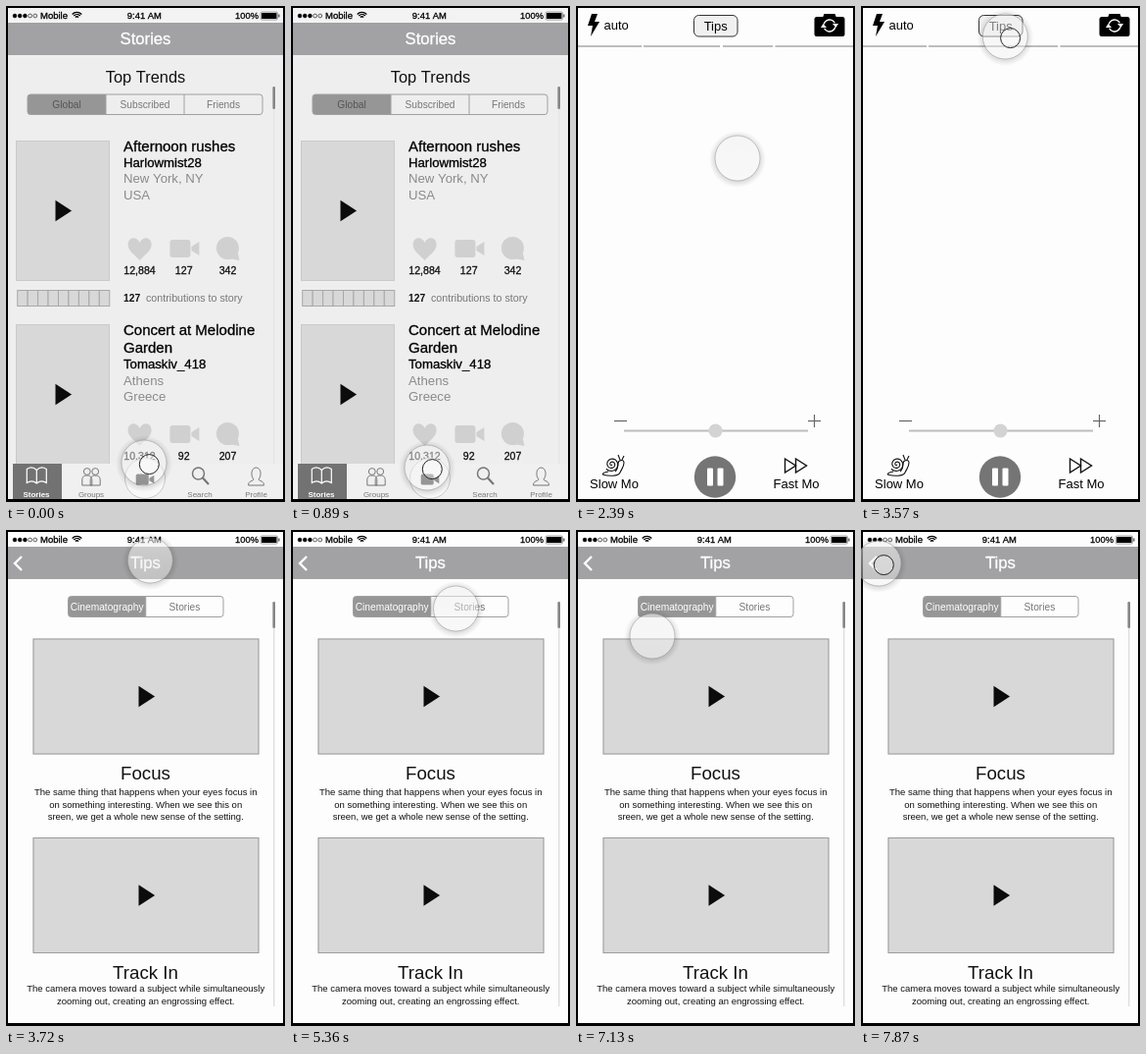
An HTML page with a canvas that plays this animation: 285 px wide and 505 px high, repeating every 8000 ms.

```html
<!DOCTYPE html>
<html lang="en">
<head>
<meta charset="utf-8">
<title>App walkthrough</title>
<style>
html, body { margin: 0; width: 100%; height: 100%; overflow: hidden; background: #000; }
canvas { display: block; width: 285px; height: 505px; }
</style>
</head>
<body>
<canvas id="stage"></canvas>
<script>
const W = 285, H = 505, LOOP = 8000, STEP = 148.6;
const canvas = document.getElementById('stage');
const ctx = canvas.getContext('2d');
const dpr = window.devicePixelRatio || 1;
canvas.width = W * dpr;
canvas.height = H * dpr;

// Touch path: [step, x, y]
const path = [
  [0, 141, 465], [1, 141, 466], [3, 139, 470], [12, 139, 470],
  [13, 141, 450], [14, 149, 365], [15, 159, 245], [16, 165, 155], [17, 167, 127],
  [18, 167, 127], [19, 164, 109], [20, 152, 55], [21, 147.3, 31],
  [31, 147.3, 31], [36, 168.5, 80], [39, 182, 138],
  [40, 189, 168], [41, 204, 240], [42, 217, 335], [43, 205, 404],
  [44, 178, 430], [45, 136, 375], [46, 102, 220], [47, 87, 126],
  [48, 78, 108], [49, 50, 58], [50, 26, 32], [51, 18, 34], [54, 18, 34]
];
const presses = [0, 6, 23, 24, 53];
const CAMERA_AT = 7, TIPS_AT = 25;

function touchAt(n) {
  const i = path.findIndex(k => k[0] > n);
  const a = path[i - 1], b = path[i];
  const s = (n - a[0]) / (b[0] - a[0]);
  return [a[1] + (b[1] - a[1]) * s, a[2] + (b[2] - a[2]) * s];
}

// Drawing helpers
function text(str, x, y, size, color = '#000', align = 'left', weight = 400) {
  ctx.font = `${weight} ${size}px "Liberation Sans", Arial, sans-serif`;
  ctx.textAlign = align;
  ctx.fillStyle = color;
  ctx.fillText(str, x, y);
  // Medium weight: regular glyphs with a hairline outline
  if (weight === 500) {
    ctx.strokeStyle = color;
    ctx.lineWidth = 0.3;
    ctx.strokeText(str, x, y);
  }
}
const centered = (str, x, y, size, color, weight) => text(str, x, y, size, color, 'center', weight);

function box(x, y, w, h, color) {
  ctx.fillStyle = color;
  ctx.fillRect(x, y, w, h);
}
function paint(fill, stroke, width = 1) {
  if (fill) { ctx.fillStyle = fill; ctx.fill(); }
  if (stroke) { ctx.strokeStyle = stroke; ctx.lineWidth = width; ctx.stroke(); }
}
function round(x, y, w, h, r, fill, stroke, width) {
  ctx.beginPath();
  ctx.roundRect(x, y, w, h, r);
  paint(fill, stroke, width);
}
function disc(x, y, r, fill, stroke, width) {
  ctx.beginPath();
  ctx.arc(x, y, r, 0, Math.PI * 2);
  paint(fill, stroke, width);
}
function shape(d, x, y, fill, stroke, width) {
  const p = new Path2D(d);
  ctx.save();
  ctx.translate(x, y);
  if (fill) { ctx.fillStyle = fill; ctx.fill(p); }
  if (stroke) { ctx.strokeStyle = stroke; ctx.lineWidth = width || 1; ctx.stroke(p); }
  ctx.restore();
}
function line(x1, y1, x2, y2, color, width = 1) {
  ctx.beginPath();
  ctx.moveTo(x1, y1);
  ctx.lineTo(x2, y2);
  paint(null, color, width);
}

function camcorder(x, y, scale, color) {
  ctx.save();
  ctx.translate(x, y);
  ctx.scale(scale, scale);
  round(-15, -9, 21, 18, 3, color);
  shape('M7 -2L15 -7V7L7 2Z', 0, 0, color);
  ctx.restore();
}

function statusBar(bg) {
  box(2, 2, 281, 15, bg);
  for (let i = 0; i < 5; i++)
    disc(9 + i * 5.2, 10, 1.9, i < 3 ? '#000' : null, '#000', 0.6);
  text('Mobile', 35, 13.3, 9.5, '#000', 'left', 500);
  for (const r of [2.2, 4.4, 6.6]) {
    ctx.beginPath();
    ctx.arc(72.5, 13, r, -Math.PI * 0.76, -Math.PI * 0.24);
    paint(null, '#000', 1.4);
  }
  centered('9:41 AM', 141.3, 13.3, 9.4, '#000', 500);
  text('100%', 234, 13.3, 9.4, '#000', 'left', 500);
  round(260, 6, 17.5, 8, 1.5, null, '#888', 0.8);
  box(261, 7, 15.5, 6, '#000');
  box(278.2, 8.5, 1.3, 3, '#555');
}

function header(title) {
  box(2, 17, 281, 33, '#a2a2a4');
  centered(title, 142.5, 39.4, 16.7, '#fff', 500);
}

function segments(x, y, w, h, labels, activeText) {
  const part = w / labels.length, edge = '#a0a0a0';
  ctx.save();
  round(x, y, w, h, 3);
  ctx.clip();
  box(x, y, part, h, '#969696');
  ctx.restore();
  round(x, y, w, h, 3, null, edge);
  labels.forEach((label, i) => {
    if (i) line(x + part * i, y, x + part * i, y + h, edge);
    centered(label, x + part * (i + 0.5), y + h / 2 + 3.5, 10.2, i ? '#777' : activeText);
  });
}

function video(x, y, w, h, edge) {
  box(x, y, w, h, '#d8d8d8');
  ctx.strokeStyle = edge;
  ctx.lineWidth = 1;
  ctx.strokeRect(x + 0.5, y + 0.5, w - 1, h - 1);
  shape('M0 -10.8L16.6 0L0 10.8Z', x + w / 2 - 7.5, y + h / 2, '#0c0c0c');
}

function scrollbar(top, thumb, bottom, track) {
  line(273.8, top, 273.8, bottom, track);
  round(272.4, top, 2.6, thumb, 1.3, '#858585');
}

function stats(y, counts) {
  shape('M0 12C-4 7 -12 3 -12 -4C-12 -12 -3 -13 0 -6C3 -13 12 -12 12 -4C12 3 4 7 0 12Z', 136.6, y, '#d0d0d0');
  camcorder(182.4, y, 1, '#d0d0d0');
  disc(226.4, y - 0.5, 11.5, '#d0d0d0');
  shape('M2 10L12 12L10 2Z', 226.4, y, '#d0d0d0');
  counts.forEach((c, i) => centered(c, [136.5, 181.7, 226.5][i], y + 26.3, 10.6, '#111', 500));
}

function tabBar() {
  box(2, 466, 281, 36, '#f0f0f0');
  box(7, 466, 50, 36, '#727272');
  shape('M0 -6C-3 -9 -7 -9 -10 -7V7C-7 5 -3 5 0 7.5C3 5 7 5 10 7V-7C7 -9 3 -9 0 -6V7.5', 31.3, 478.5, null, '#fff', 1.2);
  centered('Stories', 31, 500, 8, '#fff', 700);
  for (const s of [-1, 1]) {
    disc(87 + s * 4.2, 474, 3.4, null, '#777');
    shape('M-5 9V4C-5 0 -3 -1 0 -1C3 -1 5 0 5 4V9Z', 87 + s * 4.2, 479, null, '#777');
  }
  centered('Groups', 87, 500, 8, '#777');
  disc(142, 481, 20.5, '#f8f8f8', '#c8c8c8');
  camcorder(142, 482, 0.62, '#555');
  disc(196.5, 476, 6, null, '#777', 1.5);
  line(201, 480.5, 207, 487, '#777', 2.2);
  centered('Search', 198, 500, 8, '#777');
  shape('M-2.5 3C-6 -1 -5 -9 0 -9C5 -9 6 -1 2.5 3C3 5 8 4 8 9H-8C-8 4 -3 5 -2.5 3Z', 255.5, 479, null, '#777');
  centered('Profile', 255.5, 500, 8, '#777');
}

function storiesPage() {
  const grey = '#8a8a8a';
  const medium = (s, y, size) => text(s, 120, y, size, '#000', 'left', 500);
  box(2, 2, 281, 500, '#eeeeee');
  statusBar('#f3f3f3');
  header('Stories');
  centered('Top Trends', 142.5, 77.7, 16.4, '#111');
  segments(22, 90, 240, 20.5, ['Global', 'Subscribed', 'Friends'], '#555');
  scrollbar(82, 23, 466, '#e2e2e2');

  video(10, 137, 96, 143, '#cacaca');
  medium('Afternoon rushes', 148, 15);
  medium('Harlowmist28', 164, 13.2);
  text('New York, NY', 120, 180, 13.2, grey);
  text('USA', 120, 197, 13.2, grey);
  stats(247, ['12,884', '127', '342']);

  for (let i = 0; i < 9; i++) {
    const x = 11.7 + i * 10.45;
    box(x, 289.5, 10.45, 16, '#d8d8d8');
    ctx.strokeStyle = '#a8a8a8';
    ctx.lineWidth = 1;
    ctx.strokeRect(x, 289.5, 10.45, 16);
  }
  text('127', 120, 301, 10.3, '#111', 'left', 700);
  text('contributions to story', 143, 301, 10.7, '#777');

  video(10, 324, 96, 143, '#cacaca');
  medium('Concert at Melodine', 335, 15);
  medium('Garden', 353, 15);
  medium('Tomaskiv_418', 369, 13.2);
  text('Athens', 120, 386, 13.2, grey);
  text('Greece', 120, 402, 13.2, grey);
  stats(436, ['10,312', '92', '207']);
  tabBar();
}

function cameraPage() {
  box(2, 2, 281, 500, '#fdfdfd');
  shape('M4 0H10L7 8H12L3 23L5 12H0Z', 12, 8, '#000');
  text('auto', 28.5, 24.3, 13);
  round(120.5, 9.5, 44.5, 21.5, 5, '#f0f0f0', '#333');
  centered('Tips', 142.7, 24.5, 13);

  round(243.5, 11, 31, 20, 2.5, '#000');
  shape('M8 3L10 -2H21L23 3Z', 243.5, 10, '#000');
  for (const turn of [0, Math.PI]) {
    ctx.save();
    ctx.translate(259, 20);
    ctx.rotate(turn);
    ctx.beginPath();
    ctx.arc(0, 0, 6, Math.PI * 1.08, Math.PI * 1.85);
    paint(null, '#fff', 1.4);
    shape('M3 -2H9L6.5 2Z', 0, 0, '#fff');
    ctx.restore();
  }

  for (const [a, b] of [[2, 67], [69, 147], [150, 201], [203.5, 283]])
    line(a, 41, b, 41, '#bdbdbd', 2);

  line(39, 422.5, 52, 422.5, '#666', 1.2);
  line(237, 422.5, 250, 422.5, '#666', 1.2);
  line(243.5, 416, 243.5, 429, '#666', 1.2);
  line(49, 432.5, 237, 432.5, '#bdbdbd', 2.2);
  disc(142.5, 432.5, 7, '#d3d3d3');

  // Snail
  ctx.beginPath();
  for (let a = 0; a < 14; a += 0.2) {
    const r = 0.6 + a * 0.48;
    ctx.lineTo(36.5 + r * Math.cos(a + 1), 466.5 + r * Math.sin(a + 1));
  }
  paint(null, '#111', 1.1);
  shape('M0 20C7 22 16 22 18 18C20 14 22 12 22 8C22 4 16 5 16 9C16 13 15 15 13 17M0 20C1 17 4 18 6 17M18 5L16 0M20 5L22 1', 27, 457, null, '#111', 1.1);
  centered('Slow Mo', 39, 491, 13);

  for (const x of [213.5, 224.5])
    shape('M0 0L11 7L0 14Z', x, 461, null, '#111', 1.4);
  centered('Fast Mo', 225, 491, 13);

  disc(142, 479.5, 21.2, '#757575');
  round(134, 470.5, 6, 18, 1, '#fff');
  round(144.5, 470.5, 6, 18, 1, '#fff');
}

function tipsPage() {
  box(2, 2, 281, 500, '#fdfdfd');
  statusBar('#fdfdfd');
  header('Tips');
  shape('M8 0L1 7L8 14', 8, 27, null, '#fff', 2.4);
  segments(63.5, 67.5, 158.5, 21, ['Cinematography', 'Stories'], '#fff');
  scrollbar(73, 27, 485, '#d2d2d2');
  const tips = [
    [110.5, 'Focus', [
      'The same thing that happens when your eyes focus in',
      'on something interesting. When we see this on',
      'sreen, we get a whole new sense of the setting.'], 270.2],
    [313, 'Track In', [
      'The camera moves toward a subject while simultaneously',
      'zooming out, creating an engrossing effect.'], 470.2]
  ];
  for (const [y, title, lines, base] of tips) {
    video(27.5, y, 231, 118, '#9c9c9c');
    centered(title, 142.5, y + 143.6, 18.7, '#111');
    lines.forEach((s, i) => centered(s, 142.7, base + i * 12.3, 9.5, '#111'));
  }
}

function touch(x, y, pressed) {
  // Soft shadow kept outside the translucent disc
  ctx.save();
  ctx.beginPath();
  ctx.rect(0, 0, W, H);
  ctx.arc(x, y, 23, 0, Math.PI * 2);
  ctx.clip('evenodd');
  const halo = ctx.createRadialGradient(x, y + 1, 22, x, y + 1, 29);
  halo.addColorStop(0, 'rgba(0,0,0,.14)');
  halo.addColorStop(0.6, 'rgba(0,0,0,.05)');
  halo.addColorStop(1, 'rgba(0,0,0,0)');
  disc(x, y + 1, 29, halo);
  ctx.restore();

  const glass = ctx.createLinearGradient(0, y - 23, 0, y + 23);
  glass.addColorStop(0, 'rgba(240,240,240,.58)');
  glass.addColorStop(1, 'rgba(240,240,240,.38)');
  disc(x, y, 23, glass, 'rgba(130,130,130,.5)', 0.9);
  if (pressed) disc(x + 5.3, y + 1.6, 10, 'rgba(255,255,255,.3)', '#222', 1);
}

function draw(now) {
  const n = Math.floor((now % LOOP + 9) / STEP);
  ctx.setTransform(dpr, 0, 0, dpr, 0, 0);
  box(0, 0, W, H, '#000');
  ctx.save();
  ctx.beginPath();
  ctx.rect(2, 2, 281, 500);
  ctx.clip();
  if (n < CAMERA_AT) storiesPage();
  else if (n < TIPS_AT) cameraPage();
  else tipsPage();
  ctx.restore();
  touch(...touchAt(n), presses.includes(n));
}

const start = performance.now();
function tick() {
  draw(performance.now() - start);
  requestAnimationFrame(tick);
}
tick();
</script>
</body>
</html>
```
